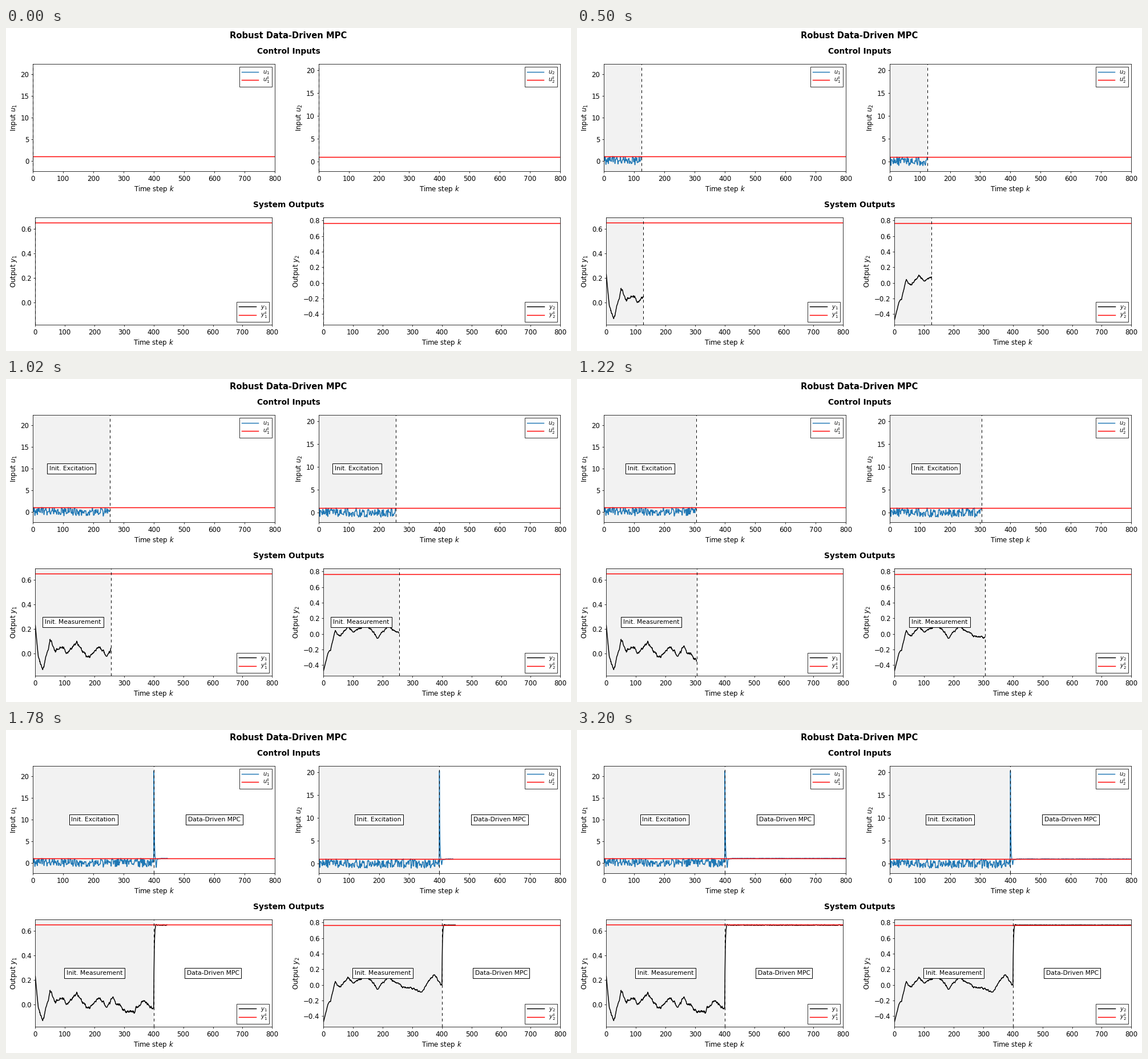
Write a matplotlib script that moves like this. It is 990 by 566 pixels and loops after 3.22 s.

```python
import numpy as np
import matplotlib.pyplot as plt
from matplotlib.animation import FuncAnimation
from matplotlib.patches import Rectangle

W, H, DPI = 990, 566, 990 / 14
STEPS, INIT, STRIDE = 800, 400, 5
LABEL_FROM = 230

plt.rcParams["font.family"] = "DejaVu Sans"
rng = np.random.default_rng(4)
k = np.arange(STEPS + 1)
after = k[INIT:] - INIT


def bump(t, center, width):
    return np.exp(-((t - center) / width) ** 2)


def control_input(peak, dip):
    """Random excitation, then a kick that undershoots and settles at 1."""
    u = np.repeat(rng.uniform(-1, 1, STEPS // 2 + 1), 2)[:STEPS + 1]
    kick = (peak - 0.4) * np.exp(-after / 1.2) - dip * bump(after, 7.5, 1.5)
    settle = 1 - 0.6 * np.exp(-after / 8)
    u[INIT:] = settle + kick + rng.uniform(-0.06, 0.06, after.size)
    return u


def measured_output(turns, target, tau):
    """Noisy path through its main turns, then a fast rise to target."""
    ks, vs = zip(*turns)
    drift = np.convolve(rng.normal(0, 0.006, STEPS + 1),
                        0.8 ** np.arange(20))[:STEPS + 1]
    y = np.interp(k, ks, vs) + drift * np.minimum(k / 20, 1)
    rise = target - 0.002 - (target - vs[-1]) * np.exp(-after / tau)
    rise += 0.01 * bump(after, 7, 3)
    y[INIT:] = rise + rng.uniform(-0.003, 0.003, after.size)
    return y


u1 = control_input(21.2, 2.1)
u2 = control_input(20.25, 1.1)
y1 = measured_output(
    [(0, 0.23), (10, -0.03), (25, -0.14), (50, 0.1), (68, 0.01), (90, 0.06),
     (110, 0), (140, 0.085), (182, -0.04), (215, 0.06), (242, -0.02),
     (263, 0.055), (300, -0.05), (334, -0.06), (360, 0.03), (400, -0.03)],
    0.65, 1.7)
y2 = measured_output(
    [(0, -0.47), (15, -0.25), (24, -0.2), (40, 0.05), (55, -0.02),
     (84, 0.08), (103, 0.02), (145, 0.12), (182, -0.04), (216, 0.09),
     (283, -0.04), (330, -0.08), (373, 0.13), (400, 0)],
    0.77, 1.5)

fig = plt.figure(figsize=(W / DPI + 1e-6, H / DPI + 1e-6), dpi=DPI)


def heading(text, baseline, size):
    fig.text(0.5, 1 - baseline / H, text, size=size, weight="bold",
             ha="center", va="baseline")


heading("Robust Data-Driven MPC", 18.2, 15)
heading("Control Inputs", 45.2, 14)
heading("System Outputs", 314.2, 14)


class Panel:
    def __init__(self, box, ylim, ticks, data, color, target, kind, name,
                 phase, loc):
        left, right, top, bottom = box
        ax = fig.add_axes([left / W, 1 - bottom / H,
                           (right - left) / W, (bottom - top) / H])
        ax.set(xlim=(0, STEPS), ylim=ylim, yticks=ticks)
        ax.set_xlabel("Time step $k$", size=12, labelpad=3)
        ax.set_ylabel(f"{kind} ${name}$", size=12)
        ax.tick_params(labelsize=12)

        self.data = data
        self.curve, = ax.plot([], [], color=color, label=f"${name}$")
        ax.axhline(target, color="red", label=f"${name}^s$")
        self.shade = ax.add_patch(
            Rectangle((0, ylim[0]), 0, ylim[1] - ylim[0],
                      color="gray", alpha=0.1, lw=0))
        self.edge = ax.axvline(0, color="black", lw=1, ls=(0, (5, 5)))

        mid = sum(ylim) / 2
        style = dict(size=11, ha="center", va="center",
                     bbox=dict(facecolor="white", edgecolor="black"))
        self.init_label = ax.text(0, mid, f"Init. {phase}", **style)
        self.mpc_label = ax.text((INIT + STEPS) / 2, mid, "Data-Driven MPC",
                                 **style)
        ax.legend(loc=loc, fontsize=10, handlelength=3, labelspacing=0,
                  fancybox=False, edgecolor="black")

    def show(self, step):
        front = min(step, INIT)
        self.curve.set_data(k[:step + 1], self.data[:step + 1])
        self.shade.set_width(front)
        self.edge.set_xdata([front, front])
        self.init_label.set_x(front / 2)
        self.init_label.set_visible(step >= LABEL_FROM)
        self.mpc_label.set_visible(step >= INIT)
        return (self.curve, self.shade, self.edge, self.init_label,
                self.mpc_label)


in_style = dict(ticks=range(0, 21, 5), color="tab:blue", target=1,
                kind="Input", phase="Excitation", loc="upper right")
out_style = dict(color="black", kind="Output", phase="Measurement",
                 loc="lower right")

panels = [
    Panel((47.2, 471.3, 63.3, 250.8), (-2.4, 22.33), data=u1, name="u_1",
          **in_style),
    Panel((547.6, 971.3, 63.3, 250.8), (-2.09, 21.33), data=u2, name="u_2",
          **in_style),
    Panel((51.3, 466.3, 331.8, 519.8), (-0.182, 0.695), data=y1, name="y_1",
          target=0.65, ticks=np.arange(0, 4) / 5, **out_style),
    Panel((556.4, 971.3, 331.8, 519.8), (-0.534, 0.841), data=y2, name="y_2",
          target=0.77, ticks=np.arange(-2, 5) / 5, **out_style),
]


def update(i):
    return [artist for p in panels for artist in p.show(i * STRIDE)]


anim = FuncAnimation(fig, update, frames=STEPS // STRIDE + 1, interval=20,
                     repeat=True, repeat_delay=0, blit=False)
plt.show()
```
